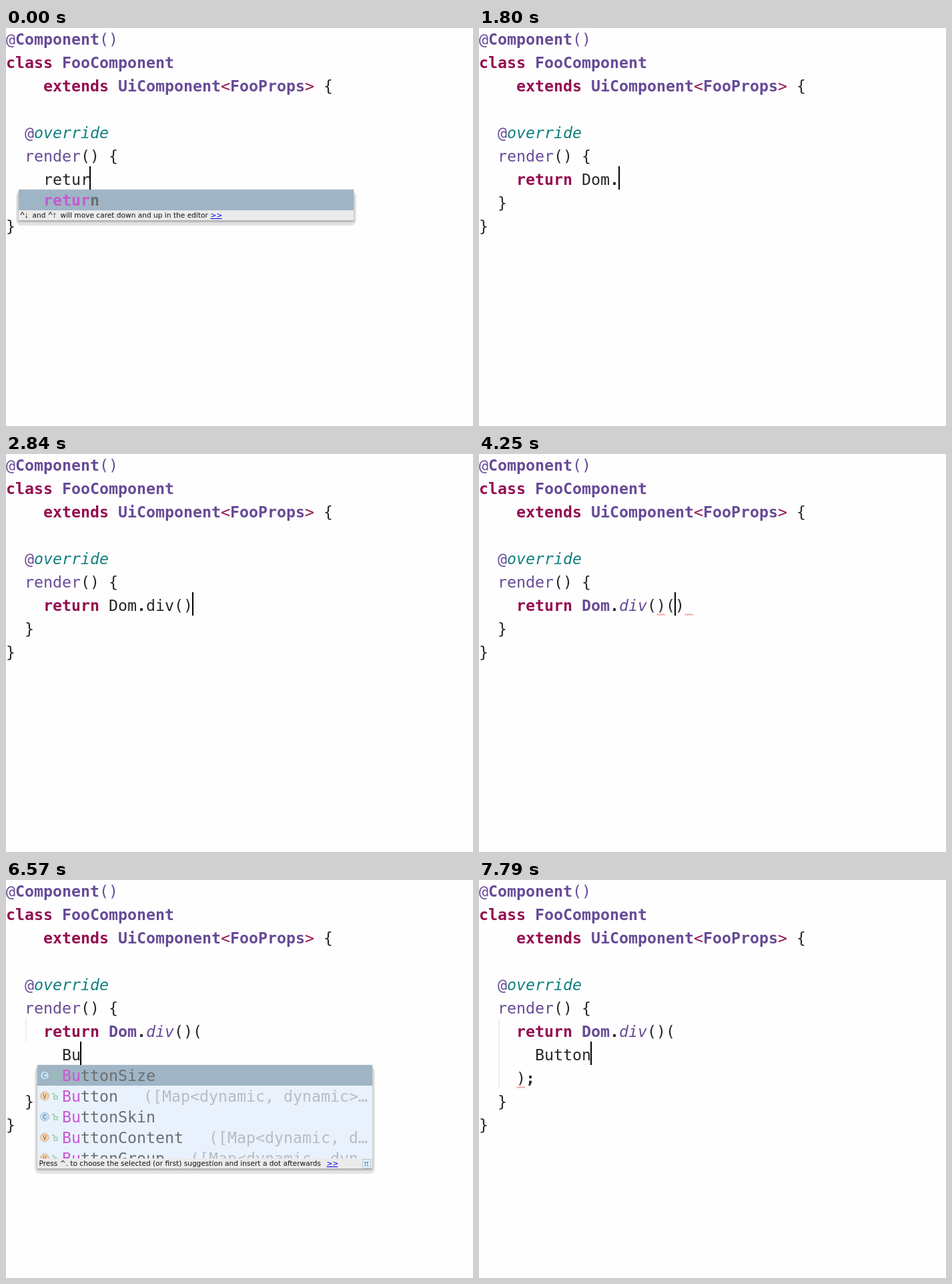
These frames come from a looping animation (700 px wide and 596 px high, 8 s). An HTML page with a canvas:

```html
<!DOCTYPE html>
<html lang="en">
<head>
<meta charset="utf-8">
<title>Code completion</title>
<style>
html, body { margin: 0; width: 100%; height: 100%; overflow: hidden; background: #fefefe; }
canvas { display: block; }
</style>
</head>
<body>
<canvas id="stage" width="700" height="596"></canvas>
<script>
const ctx = document.getElementById('stage').getContext('2d');
const LOOP = 8000, CELL = 14, LINE = 35, ROW = 31;
const MONO = '23.25px "DejaVu Sans Mono", monospace';
const SANS = '"DejaVu Sans", sans-serif';

// style letter: [font variant, colour]
const STYLES = {
  p: ['', '#262626'],
  d: ['bold ', '#262626'],
  k: ['bold ', '#940e50'],
  a: ['', '#940e50'],
  t: ['bold ', '#674b97'],
  u: ['', '#674b97'],
  i: ['italic ', '#674b97'],
  o: ['italic ', '#11807f'],
  m: ['', '#c65ad0'],
  M: ['bold ', '#c65ad0'],
  g: ['', '#6c6e70'],
  G: ['bold ', '#6c6e70'],
  f: ['', '#b9bcc0']
};

const HEAD = [
  ['u@', 'tComponent', 'u()'],
  ['kclass ', 'tFooComponent'],
  ['p    ', 'kextends ', 'tUiComponent', 'a<', 'tFooProps', 'a>', 'p {'],
  [],
  ['p  ', 'u@', 'ooverride'],
  ['p  ', 'urender', 'p() {']
];

const TYPED = [[450, ''], [750, ' '], [1020, ' D'], [1380, ' Dom'], [1800, ' Dom.'],
  [2160, ' Dom.d'], [2840, ' Dom.div()']];
const CHILD = [[0, ''], [6170, 'B'], [6570, 'Bu'], [7790, 'Button']];

// time, column, line; a negative column hides the caret
const CARET = [[0, 9, 6], [450, 10, 6], [750, 11, 6], [1020, 12, 6], [1380, 14, 6],
  [1800, 15, 6], [2160, 16, 6], [2840, 20, 6], [3680, 21, 6], [4340, 6, 7],
  [4700, 5, 8], [5030, 6, 8], [5230, 6, 7], [6170, 7, 7], [6570, 8, 7],
  [7070, -1, 7], [7550, 8, 7], [7790, 12, 7]];

// from, to, column, line
const ERRORS = [[3230, 3680, 20, 6], [3680, 4340, 22, 6], [4250, 5680, 19, 6],
  [4340, 5030, 5, 8], [5030, LOOP, 4, 8], [5030, 5680, 6, 8]];

const MOVE_HINT = [['^↓', 0, 1], ['and', 18], ['^↑', 42, 1],
  ['will move caret down and up in the editor', 60], ['>>', 285]];
const DOT_HINT = [['Press ^. to choose the selected (or first) suggestion and insert a dot afterwards', 0],
  ['>>', 431]];

const ICONS = { m: '#f3b6b0', C: '#bcdff4', V: '#f5cfa4' };

const POPUPS = [
  { from: 0, to: 450, x: 19, y: 242, w: 502, h: 31, prefix: 5, bold: true, halo: true,
    hint: MOVE_HINT, rows: [['', 'return', '']] },
  { from: 2250, to: 2840, x: 173, y: 242, w: 464, h: 140, prefix: 1, pi: true, hint: MOVE_HINT,
    rows: [['m', 'div()', 'DomProps'], ['m', 'data()', 'DomProps'], ['m', 'datalist()', 'DomProps'],
      ['m', 'dd()', 'DomProps'], ['m', 'defs()', 'SvgProps']] },
  { from: 6570, to: 7790, x: 47, y: 277, w: 502, h: 140, prefix: 2, pi: true, halo: true, hint: DOT_HINT,
    rows: [['C', 'ButtonSize', ''], ['V', 'Button', '([Map<dynamic, dynamic>…'], ['C', 'ButtonSkin', ''],
      ['V', 'ButtonContent', '([Map<dynamic, d…'], ['V', 'ButtonGroup', '([Map<dynamic, dyn…']] }
];

const latest = (steps, t) => steps.filter(s => s[0] <= t).pop();

function rect(x, y, w, h, color) {
  ctx.fillStyle = color;
  ctx.fillRect(x, y, w, h);
}

function label(text, x, y, font, color) {
  ctx.font = font;
  ctx.fillStyle = color;
  ctx.fillText(text, x, y);
}

function write(x, y, runs) {
  for (const run of runs) {
    const [variant, color] = STYLES[run[0]], text = run.slice(1);
    label(text, x, y, variant + MONO, color);
    x += text.length * CELL;
  }
}

const codeLine = (n, runs) => write(0, n * LINE + 25, runs);

function squiggle(col, line) {
  const x = col * CELL, y = line * LINE + 31;
  ctx.beginPath();
  for (let i = 0; i <= 6; i++) ctx.lineTo(x + 0.5 + i * 2, y - (i % 2) * 2 + 0.5);
  ctx.strokeStyle = '#e5453f';
  ctx.lineWidth = 1;
  ctx.stroke();
}

function icon(kind, x, y) {
  ctx.beginPath();
  ctx.arc(x + 11, y + 15.5, 6.5, 0, 7);
  ctx.fillStyle = ICONS[kind];
  ctx.fill();
  ctx.strokeStyle = 'rgba(90,90,90,.25)';
  ctx.lineWidth = 1;
  ctx.stroke();
  ctx.textAlign = 'center';
  label(kind, x + 11, y + 18.5, '8px ' + SANS, '#66605e');
  ctx.textAlign = 'left';
  // open padlock
  ctx.strokeStyle = '#8ccb9c';
  ctx.lineWidth = 1.3;
  ctx.strokeRect(x + 25, y + 15.5, 5, 4.5);
  ctx.beginPath();
  ctx.arc(x + 24, y + 13.5, 1.8, Math.PI, 0);
  ctx.lineTo(x + 25.8, y + 15.5);
  ctx.stroke();
}

function shadow({ x, y, w, h, halo }) {
  ctx.save();
  if (halo) {
    ctx.beginPath();
    ctx.roundRect(x - 4, y + 3, w + 8, h + 20, 8);
    ctx.fillStyle = '#e4e4e4';
    ctx.fill();
  }
  ctx.shadowColor = halo ? 'rgba(0,0,0,.3)' : 'rgba(0,0,0,.45)';
  ctx.shadowBlur = halo ? 3 : 8;
  ctx.shadowOffsetY = halo ? 1 : 3;
  rect(x, y, w, h + 16, '#ececec');
  ctx.restore();
}

function footer({ x, y, w, h, hint, pi }) {
  const top = y + h;
  rect(x, top, w, 16, '#ebebec');
  for (const [text, dx, keys] of hint) {
    const link = text === '>>';
    label(text, x + 2.5 + dx, top + 11, keys ? '13px "Liberation Sans", sans-serif' : '10.6px ' + SANS,
      link ? '#0000ee' : '#111');
    if (link) rect(x + 2.5 + dx, top + 12, 17, 1, '#0000ee');
  }
  if (pi) {
    rect(x + w - 15, top + 1, 13, 14, '#b9c3cb');
    rect(x + w - 14, top + 2, 11, 12, '#e6f1f8');
    label('π', x + w - 12.5, top + 12, '12px ' + SANS, '#3b9bd0');
  }
  rect(x, top + 15, w, 1, '#aaaaaa');
}

function popup(p, chosen) {
  const { x, y, w, h } = p;
  shadow(p);
  ctx.save();
  ctx.beginPath();
  ctx.rect(x, y, w, h);
  ctx.clip();
  rect(x, y, w, h, '#e9f1fd');
  p.rows.forEach(([kind, name, tail], i) => {
    const top = y + i * ROW, on = i === chosen;
    if (on) rect(x, top, w, ROW, '#9fb5c5');
    if (kind) icon(kind, x, top);
    write(x + 37, top + 24, [
      (p.bold ? 'M' : 'm') + name.slice(0, p.prefix),
      (p.bold ? 'G' : 'g') + name.slice(p.prefix)
    ]);
    write(x + w - 7 - tail.length * CELL, top + 24, [(on ? 'g' : 'f') + tail]);
  });
  ctx.restore();
  footer(p);
}

function returnLine(t) {
  if (t < 450) return ['p    retur'];
  const start = ['p    ', 'kreturn'];
  if (t < 3230) {
    const [before, after] = latest(TYPED, t)[1].split('.');
    return after === undefined ? [...start, 'p' + before] : [...start, 'p' + before, 'd.', 'p' + after];
  }
  const call = t < 3680 ? '()' : t < 4340 ? '()()' : '()(';
  return [...start, 't Dom', 'd.', 'idiv', 'p' + call];
}

function draw(t) {
  rect(0, 0, 700, 596, '#fefefe');
  const open = POPUPS.find(p => t >= p.from && t < p.to);
  const split = t >= 4340;

  if (split) rect(29.5, 207, 1, open ? 35 : 105, '#dedede');
  HEAD.forEach((runs, n) => codeLine(n, runs));
  codeLine(6, returnLine(t));
  if (split) {
    codeLine(7, ['p      ' + latest(CHILD, t)[1]]);
    codeLine(8, ['p    )', t >= 5030 ? 'd;' : 'p']);
  }
  const end = split ? 9 : 7;
  codeLine(end, ['p  }']);
  codeLine(end + 1, ['p}']);

  for (const [from, to, col, line] of ERRORS) if (t >= from && t < to) squiggle(col, line);
  if (open) popup(open, t >= 7490 ? 1 : 0);

  const [, col, line] = latest(CARET, t);
  if (col >= 0) rect(col * CELL - 1, line * LINE - 3, 2, LINE, '#000');
}

const began = performance.now();
function tick() {
  draw((performance.now() - began) % LOOP);
  requestAnimationFrame(tick);
}
tick();
</script>
</body>
</html>
```
